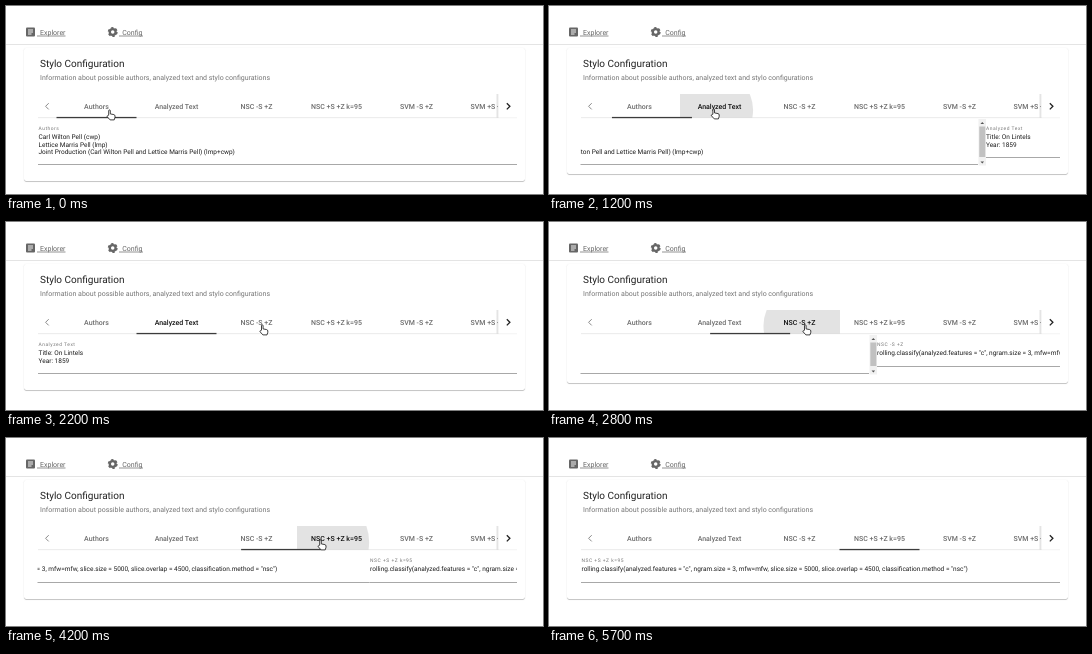
Write an HTML page that moves like this. It is 537 px wide and 188 px high and loops after 5800 ms.

```html
<!DOCTYPE html>
<html lang="en">
<head>
<meta charset="utf-8">
<title>Stylo Configuration</title>
<style>
  html, body { margin: 0; width: 100%; height: 100%; overflow: hidden; background: #fff; }
  #card {
    position: absolute; left: 18px; top: 42px; width: 501px; border-radius: 2px;
    box-shadow: 0 1px .5px -.5px rgba(0,0,0,.2), 0 .5px .5px rgba(0,0,0,.14), 0 .5px 1.5px rgba(0,0,0,.14);
  }
  svg { position: absolute; left: 0; top: 0; display: block; }
  text { font-family: Roboto, "Open Sans", sans-serif; text-rendering: geometricPrecision; white-space: pre; }
  .link { font-size: 7px; fill: #666; }
  .tab { font-size: 7px; font-weight: 500; text-anchor: middle; }
  .label { font-size: 4.9px; letter-spacing: .52px; fill: #777; }
  .body { font-size: 6.5px; fill: #1c1c1c; }
</style>
</head>
<body>
<div id="card"></div>
<svg id="stage" width="537" height="188" viewBox="0 0 537 188">
  <defs>
    <clipPath id="paneClip"><rect id="paneBox" x="31.5" y="113" width="479.5"/></clipPath>
    <clipPath id="tabClip"><rect id="tabBox" y="88" width="80" height="24"/></clipPath>
    <clipPath id="headerClip"><rect x="51" y="88" width="441" height="25"/></clipPath>
    <linearGradient id="edge"><stop stop-opacity="0"/><stop offset="1" stop-opacity=".16"/></linearGradient>
  </defs>

  <rect y="38" width="537" height="1" fill="#e4e4e4"/>
  <rect x="20" y="21.5" width="9" height="9" rx="1" fill="#666"/>
  <path d="M22 24h5M22 26h5M22 28h3.5" stroke="#fff" stroke-width=".9"/>
  <text class="link" x="34" y="28.6">Explorer</text>
  <g fill="none" stroke="#666">
    <circle cx="106.7" cy="26" r="2.9" stroke-width="2.3"/>
    <circle cx="106.7" cy="26" r="4.2" stroke-width="1.5" stroke-dasharray="2.4 2"/>
    <path d="M31 30h28.5M113 30h24" stroke-width=".7"/>
  </g>
  <text class="link" x="116.3" y="28.6">Config</text>

  <text x="34" y="60.8" font-size="10" fill="#212121">Stylo Configuration</text>
  <text x="34" y="74.4" font-size="7" fill="#757575">Information about possible authors, analyzed text and stylo configurations</text>

  <g clip-path="url(#headerClip)">
    <circle id="ripple" clip-path="url(#tabClip)"/>
    <g id="tabs"></g>
  </g>
  <rect x="32" y="111.5" width="479" height=".6" fill="#dcdcdc"/>
  <rect id="ink" y="110.9" width="80" height="1.3" fill="#3c3c3c"/>
  <rect x="489.5" y="88" width="3" height="23.5" fill="url(#edge)"/>
  <rect x="492.5" y="88" width="18.5" height="23.5" fill="#fff"/>
  <path d="M42.7 97.2l-3.1 3.1 3.1 3.1" fill="none" stroke="#888"/>
  <path d="M500.8 97.2l3.1 3.1-3.1 3.1" fill="none" stroke="#222" stroke-width="1.3"/>

  <g clip-path="url(#paneClip)">
    <g id="panes"></g>
    <g id="scrollbar">
      <rect y="113" width="7.5" height="60" fill="#f1f1f1"/>
      <rect id="thumb" x=".8" y="120.5" width="6" fill="#c1c1c1"/>
      <path d="M2 118l1.8-2 1.8 2z" fill="#555"/>
      <path id="downArrow" d="M2 -4l1.8 2 1.8-2z" fill="#555"/>
    </g>
  </g>

  <g id="cursor" fill="#fff" stroke="#111" stroke-width=".8" stroke-linejoin="round">
    <path id="hand" d="M2.2 5.9V1.4a.8.8 0 0 1 1.6 0V4.6l3.6.7q1.1.3 1.1 1.4V8l-.8 2.6H3.6L.7 7.4q-.3-1 .6-1.1z"/>
    <path id="arrow" d="M.5.5v8.2l1.9-1.8 1.4 3 1.3-.6-1.4-2.9h2.5z"/>
  </g>
</svg>
<script>
const LOOP = 5800, LEFT = 32.5, WIDTH = 479, TAB = 80, FIRST_TAB = 51, BAR = 7.5;
const $ = id => document.getElementById(id);

const tabNames = ['Authors', 'Analyzed Text', 'NSC -S +Z', 'NSC +S +Z k=95', 'SVM -S +Z', 'SVM +S +Z k=95'];
const command = 'rolling.classify(analyzed.features = "c", ngram.size = 3, mfw=mfw, slice.size = 5000, '
  + 'slice.overlap = 4500, classification.method = "nsc")';
const paneLines = [
  ['Carl Wilton Pell (cwp)', 'Lettice Marris Pell (lmp)',
   'Joint Production (Carl Wilton Pell and Lettice Marris Pell) (lmp+cwp)'],
  ['Title: On Lintels', 'Year: 1859'],
  [command],
  [command]
];
const clicks = [
  { tab: 1, press: 1000, x: 165, slide: 1098, duration: 520 },
  { tab: 2, press: 2560, x: 256, slide: 2663, duration: 460 },
  { tab: 3, press: 3986, x: 315, slide: 4094, duration: 398 }
];
const BLUR = 5700;

// time, x, y and shape of the pointer; it jumps from one to the next
const pointer = [
  [0, 100.5, 103.3, 'hand'], [300, 116, 103.5, 'hand'], [400, 145, 103.5, 'hand'], [500, 167, 103.5, 'hand'],
  [800, 164, 103, 'hand'], [900, 161.7, 102.3, 'hand'], [2000, 229, 103, 'hand'], [2200, 253.3, 102.3, 'hand'],
  [3500, 287.7, 102.3, 'hand'], [3700, 311.5, 101.3, 'hand'], [4700, 270, 98, 'hand'], [4800, 212, 94, 'hand'],
  [4900, 160, 91, 'hand'], [5200, 130, 74, 'arrow'], [5300, 102, 60, 'arrow'], [5400, 0, 0, 'none']
];

function add(parent, tag, attrs, content = '') {
  const node = document.createElementNS('http://www.w3.org/2000/svg', tag);
  set(node, attrs);
  node.textContent = content;
  return parent.appendChild(node);
}

function set(node, attrs) {
  for (const name in attrs) node.setAttribute(name, attrs[name]);
}

function bezier(x1, y1, x2, y2) {
  const curve = (a, b, s) => 3 * (1 - s) ** 2 * s * a + 3 * (1 - s) * s * s * b + s ** 3;
  return x => {
    if (x <= 0) return 0;
    if (x >= 1) return 1;
    let low = 0, high = 1;
    for (let i = 0; i < 24; i++) {
      const mid = (low + high) / 2;
      if (curve(x1, x2, mid) < x) low = mid; else high = mid;
    }
    return curve(y1, y2, low);
  };
}
const slideEase = bezier(.35, 0, .25, 1);
const rippleEase = bezier(0, 0, .2, 1);

const lineY = i => 137 + 7 * paneLines[i].length;

const tabs = tabNames.map((name, i) =>
  add($('tabs'), 'text', { class: 'tab', x: FIRST_TAB + TAB * (i + .5) - .5, y: 102.6 }, name));

const panes = paneLines.map((lines, i) => {
  const group = add($('panes'), 'g', {});
  add(group, 'text', { class: 'label', x: LEFT, y: 123.9 }, tabNames[i]);
  lines.forEach((line, row) => add(group, 'text', { class: 'body', x: LEFT, y: 133.4 + 7.1 * row }, line));
  const rule = add(group, 'rect', { x: 32, y: lineY(i), height: 1, fill: '#a8a8a8' });
  return { group, rule };
});

function drawRipple(t, click) {
  const age = click ? t - click.press : Infinity;
  const fade = Math.min(1, Math.max(0, 1 - (age - 300) / 300));
  $('ripple').style.display = fade ? '' : 'none';
  if (!fade) return;
  const tabX = FIRST_TAB + TAB * click.tab;
  const reach = Math.hypot(Math.max(click.x - tabX, tabX + TAB - click.x), 17);
  set($('tabBox'), { x: tabX });
  set($('ripple'), { cx: click.x, cy: 104, r: reach * rippleEase(age / 450), 'fill-opacity': .11 * fade });
}

function drawPanes(t, click) {
  const to = click ? click.tab : 0;
  const from = Math.max(0, to - 1);
  const progress = click ? slideEase((t - click.slide) / click.duration) : 1;
  const shift = WIDTH * progress;
  const moving = progress < 1;
  const overflow = moving && lineY(from) > lineY(to);
  const bottom = lineY(to) + 8.5;

  panes.forEach(({ group, rule }, i) => {
    const leaving = moving && i === from;
    group.style.display = i === to || leaving ? '' : 'none';
    set(group, { transform: `translate(${leaving ? -shift : WIDTH - shift} 0)` });
    set(rule, { width: leaving && overflow ? WIDTH - BAR : WIDTH });
  });
  $('scrollbar').style.display = overflow ? '' : 'none';
  set($('scrollbar'), { transform: `translate(${LEFT + WIDTH - BAR - shift} 0)` });
  set($('thumb'), { height: bottom - 129 });
  set($('downArrow'), { transform: `translate(0 ${bottom})` });
  set($('paneBox'), { height: bottom - 113 });
  set($('ink'), { x: FIRST_TAB - .5 + TAB * (from + (to - from) * progress) });
  $('card').style.height = lineY(to) + 17 - 42 + 'px';
}

function drawPointer(t) {
  const [, x, y, shape] = pointer.filter(stop => stop[0] <= t).pop();
  set($('cursor'), { transform: `translate(${x} ${y})` });
  for (const id of ['hand', 'arrow']) $(id).style.display = id === shape ? '' : 'none';
}

function draw(t) {
  const pressed = clicks.filter(click => click.press <= t).pop();
  const slid = clicks.filter(click => click.slide <= t).pop();
  const focused = pressed && t < BLUR ? pressed.tab : -1;
  tabs.forEach((tab, i) => set(tab, { fill: i === focused ? '#111' : '#6c6c6c' }));
  drawRipple(t, pressed);
  drawPanes(t, slid);
  drawPointer(t);
}

const start = performance.now();
function tick() {
  draw((performance.now() - start) % LOOP);
  requestAnimationFrame(tick);
}
tick();
</script>
</body>
</html>
```
